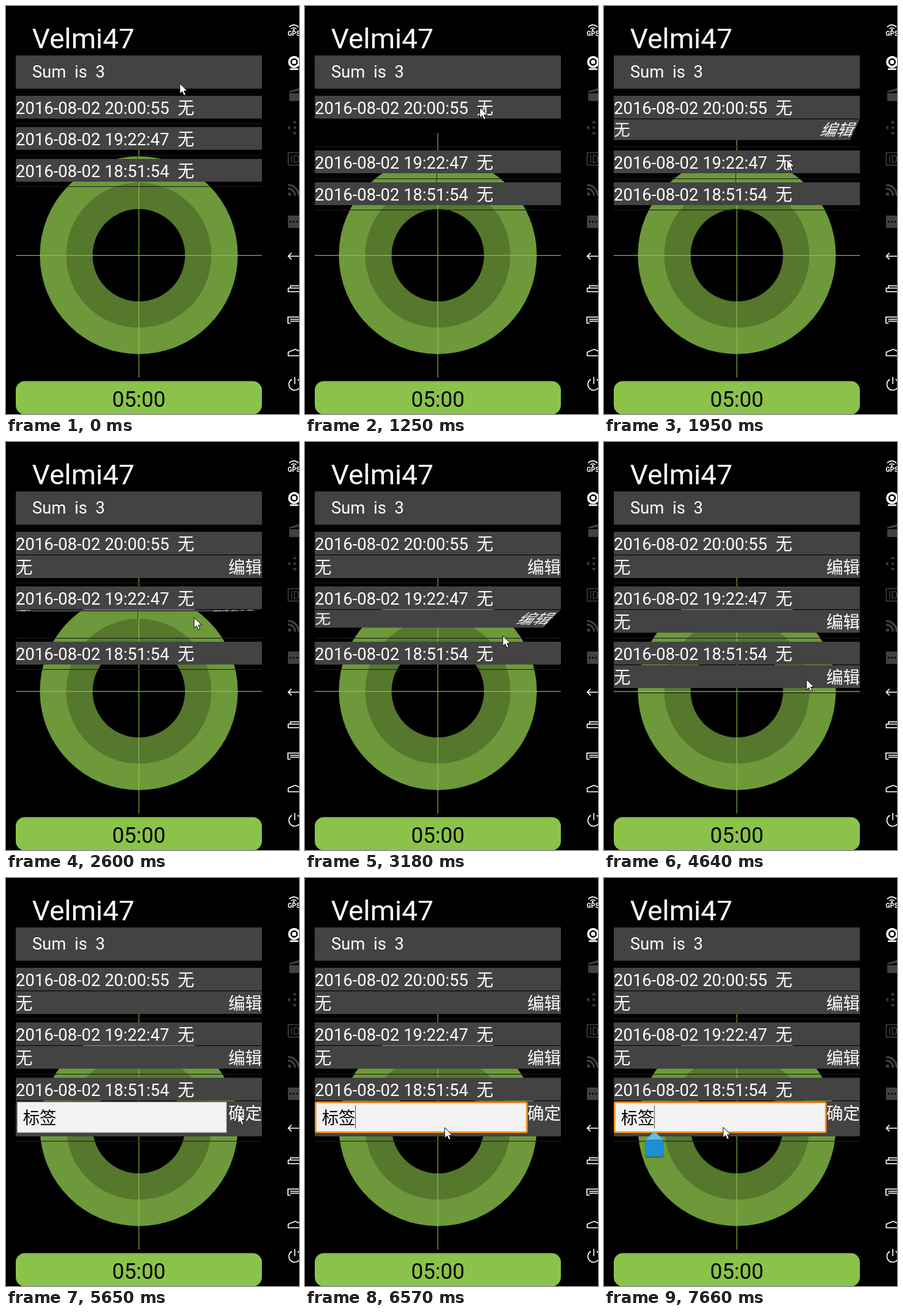
These frames come from a looping animation (450 px wide and 627 px high, 8 s). An HTML page:

```html
<!DOCTYPE html>
<html lang="zh-CN">
<head>
<meta charset="utf-8">
<title>Timer list</title>
<style>
html, body { margin: 0; width: 100%; height: 100%; overflow: hidden; background: #000; }
#stage { position: absolute; left: 0; top: 0; width: 450px; height: 627px; overflow: hidden; }
svg { position: absolute; left: 0; top: 0; display: block; overflow: hidden; }
text { font: 25.75px Roboto, "Noto Sans CJK SC", "Noto Sans CJK", sans-serif; fill: #fff; white-space: pre; }
.rule { position: absolute; left: 15px; width: 378px; height: 1px; background: #1c1c1c; }
.row, .panel { left: 15px; background: #434343; }
.panel { transform-origin: 0 0; }
.end { text-anchor: end; }
.on { fill: none; stroke: #fff; stroke-width: 1.6; }
.off { fill: none; stroke: #414141; stroke-width: 1.6; }
.off .solid { fill: #414141; stroke: none; }
</style>
</head>
<body>
<div id="stage">
  <svg width="450" height="627">
    <text x="40" y="65" style="font-size:43.3px">Velmi47</text>
    <rect x="15" y="76" width="378" height="51" fill="#434343"/>
    <text x="40.3" y="109.5">Sum  is  3</text>

    <circle cx="204" cy="383" r="152" fill="#6d993a"/>
    <circle cx="204" cy="383" r="111.5" fill="#55782d"/>
    <circle cx="204" cy="383" r="71"/>
    <path d="M202.8 231V271.5" stroke="#000"/>
    <path d="M15 383.3H393M204 195V571" stroke="#8bc34a" stroke-width="1.2" opacity=".9"/>

    <rect x="15" y="576.5" width="378" height="51" rx="14" fill="#8bc34a"/>
    <text x="204" y="615.5" text-anchor="middle" style="font-size:33px;fill:#000">05:00</text>

    <!-- side bar -->
    <g class="on">
      <path d="M435 32.500a9 9 0 0 1 14 0M438 35a6 6 0 0 1 8 0"/>
      <circle cx="442" cy="36.500" r=".6"/>
      <circle cx="442.500" cy="86" r="7.500" stroke-width="3.500"/>
      <circle cx="442.500" cy="86" r="2.500" fill="#fff"/>
      <path d="M436 97H449" stroke-width="2.500"/>
      <path d="M438.500 379.500L433.500 384.500L438.500 389.500M433.500 384.500H452"/>
      <path d="M437 433.500V430H452M452 439H433.500V433.500H452"/>
      <path d="M433 488V478H452M436.500 481.500H452M436.500 484.500H452M433 487.500H437"/>
      <path d="M433.500 538V532L444 527.500L454 532M433.500 537.500H452"/>
      <path d="M439 573.700a9 9 0 1 0 9 0M443.500 570V581"/>
    </g>
    <text x="432.500" y="46" style="font-size:10px;font-weight:700">GPS</text>
    <g class="off">
      <path class="solid" d="M435 134H452V146H435ZM434.500 131L452 125.500V130L435.500 133Z"/>
      <circle class="solid" cx="443.500" cy="187" r="2"/>
      <path class="solid" d="M432.500 187l4-3.500v7zM443.500 176l3.500 4h-7zM443.500 198l3.500-4h-7z"/>
      <path d="M452 225.500H433.500V244.500H452"/>
      <path d="M433 280.500a11 11 0 0 1 11 11M433 275a16.500 16.500 0 0 1 16.500 16.500" stroke-width="3"/>
      <circle class="solid" cx="435.500" cy="289" r="2.500"/>
      <path class="solid" d="M433 322H452V341H433Z"/>
      <path d="M436 331.500H452" stroke="#000" stroke-width="2.500" stroke-dasharray="2.500"/>
    </g>
    <text x="436.500" y="241" style="font-size:16px;fill:#414141">ID</text>
  </svg>

  <div id="list"></div>

  <svg width="450" height="627">
    <g id="edit">
      <rect x="15" y="343" width="378" height="54" fill="#434343"/>
      <rect id="field" x="17.500" y="344.500" width="321" height="46.500" fill="#f2f2f2" stroke="#bbb"/>
      <rect id="focus" x="16.200" y="344.700" width="324.600" height="46" rx="2" fill="#f2f2f2" stroke="#f08a1c" stroke-width="2.500"/>
      <text x="26" y="377.500" style="fill:#000">标签</text>
      <text class="end" x="393" y="370.500">确定</text>
      <path id="caret" d="M77.500 350V385" stroke="#555"/>
    </g>
    <g id="handle">
      <rect x="63.500" y="403" width="28" height="27" rx="3" fill="#000" opacity=".3"/>
      <path d="M77.500 389L91 402.500H64Z" fill="#5fc0ea"/>
      <path d="M64 402H91V426q0 2-2 2H66q-2 0-2-2Z" fill="#1e8fd0"/>
    </g>
    <path id="cursor" d="M0 0V16L3.700 12.600L6.300 18.500L9 17.300L6.500 11.500H11.500Z" fill="#fff" stroke="#000" stroke-width=".9"/>
  </svg>
</div>
<script>
const LOOP = 8000, PITCH = 48.5, FOLD = 36, FORM = 55, TURN = 1000;
const EDIT = 5650, FOCUS = 6560, HANDLE = 6810, BLINK = 550;

// the screen refreshes in bursts: first, last, count
const BURSTS = [[120, 820, 6], [1250, 2210, 8], [2450, 3480, 8], [3640, 4640, 8],
  [4790, 5060, 3], [EDIT, 6690, 9], [HANDLE, 7110, 3]];

// pointer: time, x, y
const PATH = [[0, 267, 119], [260, 263, 112], [820, 267, 153], [1400, 269, 157],
  [1940, 281, 236], [2600, 289, 270], [3930, 334, 354], [4640, 311, 365],
  [5060, 356, 361], [5780, 356, 361], [6420, 215, 384], [HANDLE, 214, 383],
  [7110, 183, 383], [LOOP, 183, 383]];

const ITEMS = [
  { time: "20:00:55", open: 1225 },
  { time: "19:22:47", open: 2450 },
  { time: "18:51:54", open: 3567 }
];

const $ = id => document.getElementById(id);
const show = (el, on) => { el.style.display = on ? "" : "none"; };

for (const item of ITEMS) {
  $("list").insertAdjacentHTML("beforeend", `<div>
    <svg class="row" width="378" height="35"><text x="0" y="27.5">2016-08-02 ${item.time}  无</text></svg>
    <svg class="panel" width="378" height="35"><text x="0" y="27.5">无</text><text class="end" x="378" y="27.5">编辑</text></svg>
    <div class="rule"></div></div>`);
  [item.row, item.panel, item.rule] = $("list").lastElementChild.children;
}

// time of the latest refresh
function refreshed(t) {
  const burst = BURSTS.filter(b => b[0] <= t).pop();
  if (!burst) return 0;
  const [first, last, count] = burst;
  const gap = (last - first) / (count - 1);
  return first + gap * Math.min(count - 1, Math.floor((t - first) / gap));
}

function pointer(t) {
  const i = PATH.findIndex(p => p[0] > t);
  const [t0, x0, y0] = PATH[i - 1], [t1, x1, y1] = PATH[i];
  const k = (t - t0) / (t1 - t0);
  return [x0 + (x1 - x0) * k, y0 + (y1 - y0) * k];
}

// panel angle, easing from 90 to 0 degrees
function unfold(t) {
  const x = Math.min(1, t / TURN);
  return 45 * (1 + Math.cos(x * Math.PI));
}

function draw(t) {
  let y = 138;
  for (const item of ITEMS) {
    const open = t >= item.open;
    const editing = item === ITEMS[2] && t >= EDIT;
    const top = Math.floor(y), extra = editing ? FORM : open ? FOLD : 0;
    item.row.style.top = top + "px";
    item.panel.style.top = top + FOLD + "px";
    item.rule.style.top = Math.floor(y + 42.5 + extra) + "px";
    show(item.panel, open && !editing);
    const angle = open ? unfold(t - item.open) : 90;
    item.panel.style.transform = angle ? `perspective(246px) rotateX(${-angle}deg)` : "none";
    y += PITCH + extra;
  }

  const focused = t >= FOCUS;
  show($("edit"), t >= EDIT);
  show($("field"), !focused);
  show($("focus"), focused);
  show($("handle"), t >= HANDLE);
  $("cursor").setAttribute("transform", `translate(${pointer(t).join(" ")})`);
}

const begin = performance.now();
function tick() {
  const t = Math.max(0, performance.now() - begin) % LOOP;
  draw(refreshed(t));
  show($("caret"), t >= FOCUS && Math.floor((t - FOCUS) / BLINK) % 2 === 0);
  requestAnimationFrame(tick);
}
tick();
</script>
</body>
</html>
```
